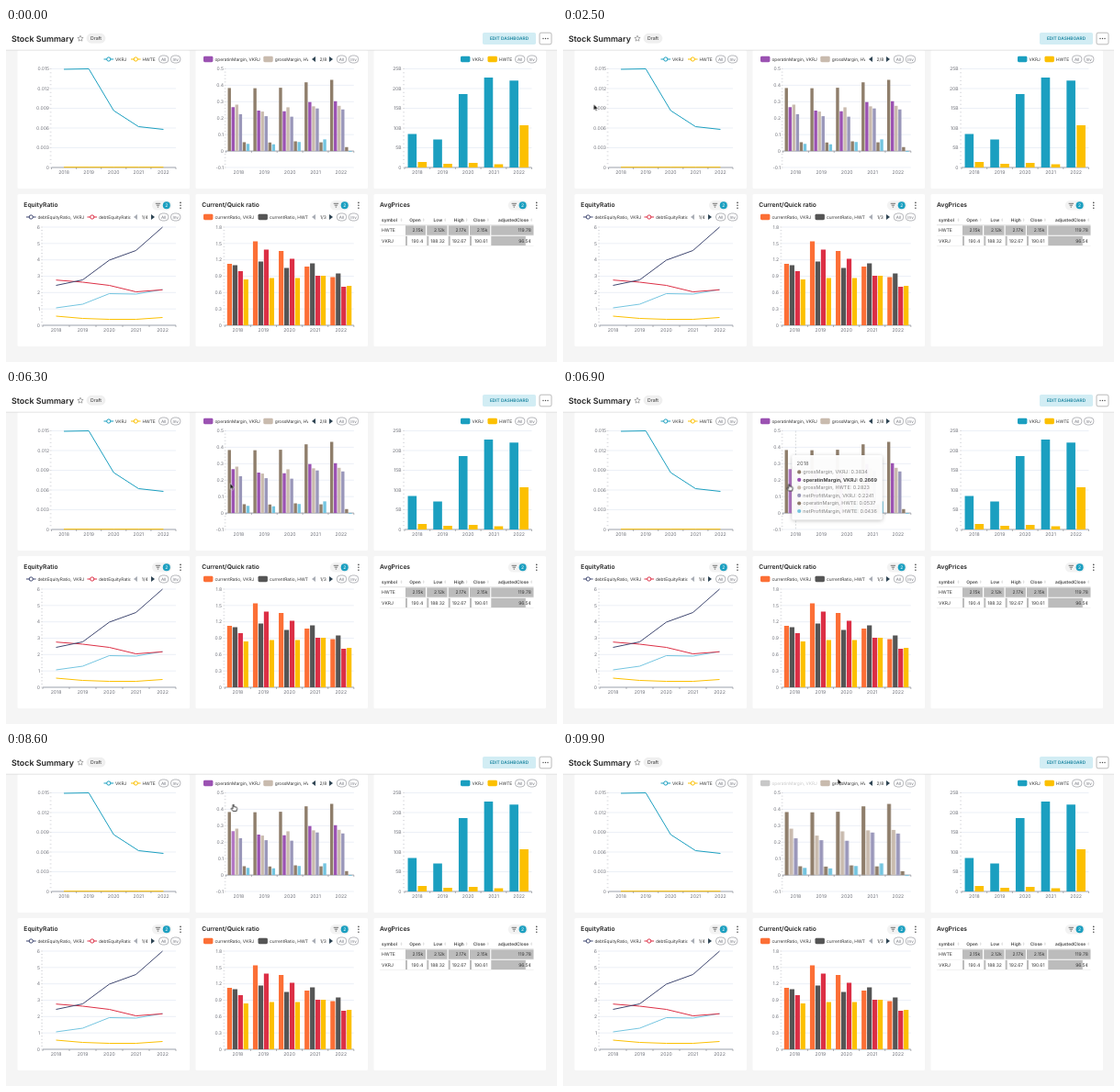
Animation, 600 px wide and 364 px high, one loop 10 s. Source, as an HTML page:

```html
<!DOCTYPE html>
<html lang="en">
<head>
<meta charset="utf-8">
<title>Stock Summary</title>
<style>
html, body { margin: 0; width: 100%; height: 100%; overflow: hidden; background: #f5f5f5; }
svg { display: block; width: 600px; height: 364px; font-family: Inter, "Liberation Sans", sans-serif; text-rendering: geometricPrecision; }
.bar { transform-box: fill-box; transform-origin: 0 0; animation: regroup 10s infinite; }
.gone { animation: remove 10s infinite; }
.lit { animation: remove 10s infinite, light 10s step-end infinite; }
.off { animation: off 10s step-end infinite; }
#tip { animation: tip 10s step-end infinite; }
#cursor { animation: move 10s linear infinite; }
#arrow { animation: arrow 10s step-end infinite; }
#hand { animation: hand 10s step-end infinite; }
@keyframes regroup {
  0%, 92.5% { transform: none; animation-timing-function: cubic-bezier(.2, .6, .35, 1); }
  97%, 100% { transform: translateX(var(--dx)) scaleX(var(--sx)); }
}
@keyframes remove { 0%, 92.5% { opacity: 1; } 94.5%, 100% { opacity: 0; } }
@keyframes light { 0% { fill: #9b52b2; } 67% { fill: #b276c4; } 92.5% { fill: #9b52b2; } }
@keyframes off { 0% { fill: var(--on); } 92.5%, 100% { fill: #c8c8c8; } }
@keyframes tip { 0% { opacity: 0; } 67% { opacity: 1; } 85%, 100% { opacity: 0; } }
@keyframes arrow { 0% { opacity: 0; } 8% { opacity: 1; } 31.5% { opacity: 0; } 48% { opacity: 1; } 67% { opacity: 0; } 98.5%, 100% { opacity: 1; } }
@keyframes hand { 0% { opacity: 0; } 67% { opacity: 1; } 98.5%, 100% { opacity: 0; } }
@keyframes move {
  0%, 8% { transform: translate(12px, 112px); }
  12% { transform: translate(26px, 95px); }
  16% { transform: translate(33px, 84px); }
  25%, 27% { transform: translate(33.5px, 83px); }
  31.5%, 48% { transform: translate(14px, 92px); }
  54% { transform: translate(150px, 88px); }
  60% { transform: translate(236px, 99px); }
  63% { transform: translate(244px, 101.5px); }
  67%, 83% { transform: translate(246.3px, 102.5px); }
  87% { transform: translate(248px, 42px); }
  89%, 96.5% { transform: translate(248.5px, 33.5px); }
  98% { transform: translate(257px, 32.5px); }
  99% { transform: translate(299px, 29px); }
  100% { transform: translate(312px, 29px); }
}
</style>
</head>
<body>
<svg id="stage" viewBox="0 0 600 364"></svg>
<script>
const stage = document.getElementById('stage');
const A = 'VKRJ', B = 'HWTE';
const YEARS = [2018, 2019, 2020, 2021, 2022];
const C = {
  teal: '#1b9fc0', yellow: '#fcc000', navy: '#3f4770', red: '#dc2f45', sky: '#74c5e0',
  orange: '#fc6f36', gray: '#555', purple: '#9b52b2', brown: '#8f7e6b', tan: '#c9bbae',
  lilac: '#9a97ba', ink: '#333', axis: '#6e7079'
};

function el(tag, attrs, parent = stage, content = '') {
  const node = document.createElementNS('http://www.w3.org/2000/svg', tag);
  for (const key in attrs) node.setAttribute(key, attrs[key]);
  node.textContent = content;
  return parent.appendChild(node);
}
const rect = (x, y, width, height, fill, more = {}, parent) =>
  el('rect', { x, y, width, height, fill, ...more }, parent);
const line = (x1, y1, x2, y2, stroke, width = .6, more = {}, parent) =>
  el('line', { x1, y1, x2, y2, stroke, 'stroke-width': width, ...more }, parent);
const dot = (cx, cy, r, fill, more = {}, parent) => el('circle', { cx, cy, r, fill, ...more }, parent);
const text = (s, x, y, size, fill = C.ink, more = {}, parent) =>
  el('text', { x, y, 'font-size': size, fill, ...more }, parent, s);
const MID = { 'text-anchor': 'middle' }, END = { 'text-anchor': 'end' };

function header() {
  rect(0, 0, 600, 24, '#fff');
  line(0, 24.2, 600, 24.2, '#dedede', .8);
  text('Stock Summary', 6, 14.6, 8.9, '#222', { 'font-weight': 600 });
  const star = [...Array(10)].map((_, i) => {
    const a = i * Math.PI / 5, r = i % 2 ? 1.5 : 3.3;
    return [81 + r * Math.sin(a), 11.5 - r * Math.cos(a)];
  });
  el('polygon', { points: star.join(' '), fill: 'none', stroke: '#777', 'stroke-width': .6 });
  rect(88, 6.3, 20, 10, '#f0f0f0', { rx: 5, stroke: '#e2e2e2', 'stroke-width': .4 });
  text('Draft', 98, 13.2, 5.2, C.ink, MID);
  rect(519, 5, 58, 13, '#d2edf4', { rx: 1.8 });
  text('EDIT DASHBOARD', 548, 13.2, 4.8, '#1a85a0', { ...MID, 'font-weight': 600 });
  rect(581, 5.2, 13, 12.6, '#fff', { rx: 1.8, stroke: '#8c8c8c', 'stroke-width': .6 });
  for (const x of [585, 587.5, 590]) dot(x, 11.5, .65, '#444');
}

function panels() {
  for (const x of [12.5, 206.5, 400.5]) {
    rect(x, 24, 187.5, 151, '#fff', { rx: 1.5 });
    rect(x, 181, 187.5, 166, '#fff', { rx: 1.5 });
  }
  ['EquityRatio', 'Current/Quick ratio', 'AvgPrices'].forEach((name, i) => {
    const x = i * 193.9;
    text(name, x + 19.3, 195.4, 6.75, '#222', { 'font-weight': 600 });
    rect(x + 159, 188, 21.5, 10.5, '#f3f3f3', { rx: 5.2 });
    [2.7, 1.7, .7].forEach((w, k) => line(x + 165.5 - w, 191.3 + k * 1.9, x + 165.5 + w, 191.3 + k * 1.9, '#555', .8));
    dot(x + 174.8, 193.3, 4, C.teal);
    text('2', x + 174.8, 195.1, 5, '#fff', MID);
    for (const y of [190.4, 193.3, 196.2]) dot(x + 190, y, .8, '#444');
  });
}

// Axes with labels, grid lines and minor ticks; returns value and category scales.
function axes({ x0, x1, top, bottom, labels, min = 0, max, right, zero = bottom }) {
  const gap = (bottom - top) / (labels.length - 1), band = (x1 - x0) / 5;
  labels.forEach((label, i) => {
    const y = top + i * gap;
    line(x0, y, x1, y, '#e0e6f1', .6);
    text(label, right, y + 1.8, 5.05, C.axis, END);
  });
  for (let y = top; y <= bottom + .1; y += gap / 5) line(x0 - 1.8, y, x0, y, '#b4b7be', .5);
  line(x0, zero, x1, zero, C.axis, .6);
  for (let i = 0; i <= 5; i++) line(x0 + i * band, zero, x0 + i * band, zero + 2, C.axis, .5);
  const cx = i => x0 + (i + .5) * band;
  YEARS.forEach((year, i) => text(year, cx(i), bottom + 6.9, 5.15, C.axis, MID));
  return { cx, y: v => bottom - (v - min) / (max - min) * (bottom - top), zero };
}

function curve(ax, ys, color) {
  el('polyline', {
    points: ys.map((y, i) => [ax.cx(i), y]).join(' '), fill: 'none', stroke: color,
    'stroke-width': 1, 'stroke-linejoin': 'round'
  });
}

function pills(x, y) {
  ['All', 'Inv'].forEach((s, i) => {
    rect(x + i * 13 - 5.3, y - 4, 10.6, 8, '#fff', { rx: 4, stroke: C.axis, 'stroke-width': .5 });
    text(s, x + i * 13, y + 1.6, 4.6, C.axis, MID);
  });
}

function pager(x, y, label, first) {
  el('path', { d: `M${x - 2} ${y}l4 -3v6z`, fill: first ? '#a9adb5' : '#2f4554' });
  text(label, x + 10.3, y + 1.8, 4.9, C.ink, MID);
  el('path', { d: `M${x + 21} ${y}l-4 -3v6z`, fill: '#2f4554' });
}

let clips = 0;
function legend(x, y, color, label, { lined, clip, more, tone } = {}) {
  if (lined) {
    line(x, y, x + 10.6, y, color, 1);
    dot(x + 5.3, y, 2.1, '#fff', { stroke: color, 'stroke-width': 1 });
  } else rect(x, y - 3.2, 10.4, 6.4, color, { rx: 1.4, ...more });
  const attrs = { ...tone };
  if (clip) {
    const id = 'clip' + clips++;
    rect(x, y - 5, clip - x, 10, '#000', {}, el('clipPath', { id }));
    attrs['clip-path'] = `url(#${id})`;
  }
  text(label, x + 12.4, y + 1.75, 4.8, C.ink, attrs);
}

function returns() {
  const ax = axes({ x0: 49.5, x1: 185, top: 44.5, bottom: 152, right: 47, max: .015,
    labels: ['0.015', '0.012', '0.009', '0.006', '0.003', '0'] });
  curve(ax, [151.7, 151.7, 151.7, 151.7, 151.7], C.yellow);
  curve(ax, [45, 44.5, 90, 107.5, 110.5], C.teal);
  legend(106.5, 34, C.teal, A, { lined: true });
  legend(136, 34, C.yellow, B, { lined: true });
  pills(171.7, 34);
}

const MARGINS = [
  ['grossMargin', A, C.brown, [.3834, .382, .385, .418, .433]],
  ['operatinMargin', A, C.purple, [.2669, .246, .242, .298, .303]],
  ['grossMargin', B, C.tan, [.2823, .24, .266, .272, .275]],
  ['netProfitMargin', A, C.lilac, [.2241, .212, .209, .259, .253]],
  ['operatinMargin', B, C.brown, [.0537, .052, .059, .053, .024]],
  ['netProfitMargin', B, C.sky, [.0436, .041, .055, .071, -.005]]
];

function margins() {
  const ax = axes({ x0: 239.5, x1: 378.8, top: 44.5, bottom: 152, right: 237, min: -.1, max: .5,
    zero: 134.1, labels: ['0.5', '0.4', '0.3', '0.2', '0.1', '0', '-0.1'] });
  const w = 3.4, step = 4.05, wide = 4.1, wideStep = 4.9;
  MARGINS.forEach(([, , color, values], k) => values.forEach((v, i) => {
    const x = ax.cx(i) - 11.9, y = ax.y(v), hidden = k === 1;
    const slot = k > 1 ? k - 1 : k;
    const bar = rect(x + k * step, Math.min(y, ax.zero), w, Math.abs(ax.zero - y), color,
      { class: hidden ? (i ? 'gone' : 'lit') : 'bar' });
    bar.style.setProperty('--dx', slot * wideStep - k * step + 'px');
    bar.style.setProperty('--sx', wide / w);
  }));
  legend(215, 34, C.purple, `operatinMargin, ${A}`, {
    more: { class: 'off', style: `--on:${C.purple}` }, tone: { class: 'off', style: `--on:${C.ink}` }
  });
  legend(280.3, 34, C.tan, `grossMargin, ${B}`, { clip: 329 });
  pager(335, 34, '2/8');
  pills(365.5, 34);
}

function grouped(ax, series, w, step) {
  series.forEach(([color, tops], k) => tops.forEach((y, i) =>
    rect(ax.cx(i) + (k - series.length / 2) * step + (step - w) / 2, y, w, ax.zero - y, color)));
}

function volume() {
  const ax = axes({ x0: 434, x1: 572.5, top: 44.5, bottom: 152, right: 430.5, max: 25,
    labels: ['25B', '20B', '15B', '10B', '5B', '0'] });
  grouped(ax, [[C.teal, [115.5, 121.5, 72, 54, 57.3]], [C.yellow, [146, 148, 147, 148.5, 106]]], 9.6, 11);
  legend(495, 34, C.teal, A);
  legend(524.5, 34, C.yellow, B);
  pills(559.7, 34);
}

function equity() {
  const ax = axes({ x0: 40, x1: 185, top: 217, bottom: 324, right: 37, max: 6,
    labels: [6, 5, 4, 3, 2, 1, 0] });
  curve(ax, [314, 316.5, 317.5, 317.5, 315.5], C.yellow);
  curve(ax, [305, 301, 289.5, 290, 285], C.sky);
  curve(ax, [274.7, 277, 280.5, 287.5, 285.3], C.red);
  curve(ax, [280.5, 274.5, 253, 242.5, 217], C.navy);
  legend(22, 206, C.navy, `debtEquityRatio, ${A}`, { lined: true });
  legend(88.5, 206, C.red, `debtEquityRatio, ${B}`, { lined: true, clip: 135.5 });
  pager(141, 206, '1/4', true);
  pills(171.7, 206);
}

function ratios() {
  const ax = axes({ x0: 238.3, x1: 378.8, top: 217, bottom: 324, right: 235, max: 1.8,
    labels: ['1.8', '1.5', '1.2', '0.9', '0.6', '0.3', '0'] });
  grouped(ax, [
    [C.orange, [257, 232.5, 243, 260, 271.5]],
    [C.gray, [258.5, 254.5, 261.5, 256.5, 267.5]],
    [C.red, [265, 241.5, 251.5, 270, 282]],
    [C.yellow, [274, 272.5, 272.5, 270, 281]]
  ], 5.2, 5.95);
  legend(215, 206, C.orange, `currentRatio, ${A}`);
  legend(274.5, 206, C.gray, `currentRatio, ${B}`, { clip: 329 });
  pager(335, 206, '1/3', true);
  pills(365.5, 206);
}

function table() {
  const sorter = x => el('path', { d: `M${x} 208.6l1 -1.2l1 1.2zM${x} 209.6l1 1.2l1 -1.2z`, fill: '#c4c4c4' });
  const bold = { 'font-weight': 600 };
  text('symbol', 409, 211, 4.8, '#444', bold);
  sorter(429.5);
  const cols = [
    ['Open', 435, 22, '2.15k', '190.4', 2],
    ['Low', 458.3, 22.2, '2.12k', '188.32', 2],
    ['High', 481.7, 22.2, '2.17k', '192.67', 2],
    ['Close', 505, 22.2, '2.15k', '190.61', 2],
    ['adjustedClose', 528.3, 46.2, '119.78', '96.54', 37.5]
  ];
  for (const [name, x, w, high, low, lowW] of cols) {
    const end = x + w;
    rect(x, 215.3, w, 10.5, '#bcbcbc');
    rect(x, 226.8, lowW, 10.3, '#bcbcbc');
    text(name, end - 5.3, 211, 4.8, '#444', { ...END, ...bold });
    sorter(end - 3.3);
    text(high, end - 2.7, 222.3, 5, C.ink, END);
    text(low, end - 2.7, 233.7, 5, C.ink, END);
  }
  line(407, 214.7, 574.5, 214.7, '#d0d0d0', .6);
  line(407, 226.3, 574.5, 226.3, '#e6e6e6', .5);
  line(407, 237.5, 574.5, 237.5, '#e6e6e6', .5);
  text(B, 409, 222.3, 5);
  text(A, 409, 233.7, 5);
}

function tooltip() {
  const g = el('g', { id: 'tip' });
  line(253.4, 44.5, 253.4, 152, '#b5b8bd', .5, { 'stroke-dasharray': '2 1.5' }, g);
  rect(249.3, 71, 98.5, 70.5, '#fff', {
    rx: 1.8, 'fill-opacity': .95, style: 'filter:drop-shadow(.5px 1px 2px rgba(0,0,0,.25))'
  }, g);
  text('2018', 254.5, 81.6, 5.8, '#666', {}, g);
  MARGINS.forEach(([name, symbol, color, values], i) => {
    const y = 89.4 + i * 8.52, strong = i === 1;
    dot(257.2, y, 2.1, color, {}, g);
    text(`${name}, ${symbol}: ${values[0].toFixed(4)}`, 261.3, y + 1.95, 5.45,
      strong ? '#444' : '#858585', { 'font-weight': strong ? 700 : 400 }, g);
  });
}

function pointer() {
  const g = el('g', { id: 'cursor' });
  el('path', { id: 'arrow', d: 'M0 0V6.6L1.5 5.3L2.5 7.6L3.6 7.1L2.6 4.9H4.6Z',
    fill: '#111', stroke: '#fff', 'stroke-width': .5 }, g);
  el('path', { id: 'hand',
    d: 'M-.7 .6Q0 -.5 .6 .6V2.6L3.4 3.2Q4.2 3.5 4 4.6L3.4 7.4H-.6L-2.4 4.9Q-2.4 4 -1.5 4.2L-.7 4.9Z',
    fill: '#fff', stroke: '#111', 'stroke-width': .8, 'stroke-linejoin': 'round' }, g);
}

[panels, header, returns, margins, volume, equity, ratios, table, tooltip, pointer].forEach(draw => draw());
</script>
</body>
</html>
```
